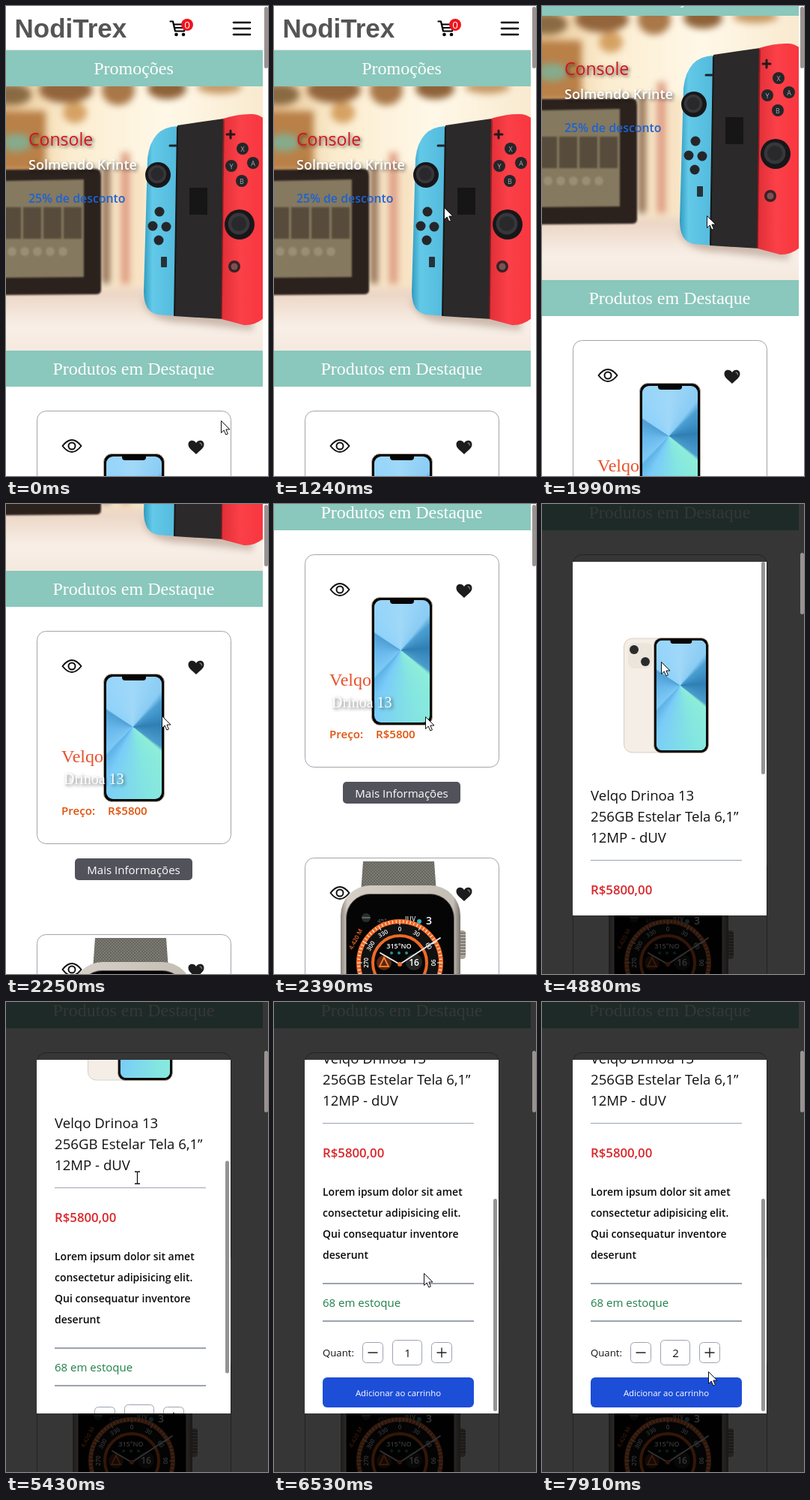
These frames come from a looping animation (350 by 626 pixels, 7.99 s). An HTML page:

```html
<!DOCTYPE html>
<html lang="pt">
<head>
<meta charset="utf-8">
<title>Loja</title>
<style>
html, body { margin: 0; width: 100%; height: 100%; overflow: hidden; background: #fff; }
svg { display: block; width: 350px; height: 626px; }
text { font-family: "Open Sans", "Noto Sans", sans-serif; white-space: pre; }
.serif { font-family: "Liberation Serif", serif; }
.brand { font-family: "Liberation Sans", sans-serif; font-weight: 700; }
.medium { font-weight: 500; }
.semi { font-weight: 600; }
.mid { text-anchor: middle; }
.shade { filter: drop-shadow(2px 2px 2px rgba(0,0,0,.6)); }
.soft { filter: blur(5px); }
.screen { width: 100%; height: 100%; border-radius: 9px;
  background: conic-gradient(at 48% 41%, #a0d8f8 0deg, #8accf4 38deg, #4a9fd2 48deg, #2f7fb4 85deg,
    #4a9ccc 125deg, #8eeed8 131deg, #84e6e0 165deg, #7accf8 205deg, #5db2e6 222deg,
    #7cc8f5 226deg, #68b8ec 265deg, #4f9fd4 302deg, #8fd2fa 305deg, #a0d8f8 360deg); }
</style>
</head>
<body>
<svg viewBox="0 0 350 626" xmlns="http://www.w3.org/2000/svg">
  <defs>
    <clipPath id="photoClip"><rect y="107" width="343" height="352"/></clipPath>
    <clipPath id="cardClip"><rect x="41" y="944" width="259" height="300" rx="12"/></clipPath>
    <clipPath id="modalClip"><rect x="41" y="77" width="259" height="471"/></clipPath>
    <linearGradient id="wall" x2="1" y2="0">
      <stop offset="0" stop-color="#e6c08c"/><stop offset=".25" stop-color="#fbecce"/>
      <stop offset=".6" stop-color="#fff8e8"/><stop offset="1" stop-color="#f8e8cc"/>
    </linearGradient>
    <linearGradient id="table" x2="0" y2="1">
      <stop offset="0" stop-color="#ead2c0"/><stop offset=".5" stop-color="#f8efe7"/><stop offset="1" stop-color="#f3e6da"/>
    </linearGradient>
    <linearGradient id="blue"><stop offset="0" stop-color="#2f9cc0"/><stop offset=".25" stop-color="#63c9e8"/><stop offset="1" stop-color="#52b9dc"/></linearGradient>
    <linearGradient id="red"><stop offset="0" stop-color="#e02f37"/><stop offset=".4" stop-color="#fb4048"/><stop offset="1" stop-color="#f8343e"/></linearGradient>
    <linearGradient id="metal"><stop offset="0" stop-color="#8b857d"/><stop offset=".06" stop-color="#d5cfc7"/><stop offset=".94" stop-color="#c4beb5"/><stop offset="1" stop-color="#77726b"/></linearGradient>
    <pattern id="weave" width="4" height="4" patternUnits="userSpaceOnUse">
      <rect width="4" height="4" fill="#7d7c74"/><path d="M0 0l2 2 2-2M0 4l2-2 2 2" stroke="#66665f" fill="none"/>
    </pattern>
  </defs>
  <rect width="350" height="626" fill="#fff"/>
  <g id="page"></g>
  <rect id="shadow" width="350" height="626" fill="#000"/>
  <g id="modal" clip-path="url(#modalClip)">
    <rect x="41" y="77" width="259" height="471" fill="#fff"/>
    <g id="details"></g>
    <rect id="innerThumb" x="293" width="5" height="283" rx="2.5" fill="#949494"/>
  </g>
  <rect id="thumb" x="345" width="5" height="82" rx="2.5" fill="#999290"/>
  <g id="cursor">
    <path id="arrow" d="M.5.5V16.5L4.2 13 6.8 19 9.4 17.9 6.9 12H12Z" fill="#fff" stroke="#111"/>
    <path id="hand" d="M5.5 15V2.5Q7-.5 8.500 2.500V8Q10.500 6.500 11.500 8.800 13.500 7.500 14.500 9.800 17 9 17 11.500V16Q17 19 15 20.500V23.500H7V21L1.500 14.500Q1 11.500 3.500 12.500Z" fill="#fff" stroke="#111"/>
    <path id="beam" d="M-3.500 0H-1Q0 0 0 1 0 0 1 0H3.500M0 1V15M-3.500 16H-1Q0 16 0 15 0 16 1 16H3.500" fill="none" stroke="#111" stroke-width="1.300"/>
  </g>
</svg>
<script>
const LOOP = 7990;
const $ = id => document.getElementById(id);
const text = (x, y, size, fill, str, cls = '') =>
  `<text x="${x}" y="${y}" font-size="${size}" fill="${fill}" class="${cls}">${str}</text>`;
const rect = (x, y, w, h, fill, more = '') =>
  `<rect x="${x}" y="${y}" width="${w}" height="${h}" fill="${fill}" ${more}/>`;
const dot = (x, y, r, fill, more = '') => `<circle cx="${x}" cy="${y}" r="${r}" fill="${fill}" ${more}/>`;
const path = (d, fill, more = '') => `<path d="${d}" fill="${fill}" ${more}/>`;
const line = (d, color, width = 1) => path(d, 'none', `stroke="${color}" stroke-width="${width}" stroke-linecap="round" stroke-linejoin="round"`);
const range = n => [...Array(n).keys()];

function header() {
  return text(11.500, 42, 35, '#555', 'NodiTrex', 'brand') +
    rect(0, 58, 343, 1, '#e4e8e7') +
    line('M219.500 20.500H223L226 33.500H238L240.500 24.500H224M225 29H238', '#000', 2.200) +
    dot(227.500, 38, 2.300, '#000') + dot(237, 38, 2.300, '#000') +
    dot(242, 25, 8, '#f0141e') + text(242, 30, 13.500, '#fff', '0', 'mid') +
    line('M304 22H326M304 30H326M304 38H326', '#000', 2.600);
}

const banner = (y, str) => rect(0, y, 343, 48, '#8ac7bc') + text(170.500, y + 32, 24, '#fff', str, 'serif mid');

function photo() {
  const button = (x, y, r, letter = '') => dot(x, y, r, '#26262a') + text(x, y + 3.500, 9, '#aaa', letter, 'mid');
  const stick = (x, y, r) => dot(x, y, r, '#17171a') + dot(x - 1, y - 1, r * .72, '#37373b') + dot(x - 1, y - 1, r * .5, '#29292c');
  const blob = (x, y, rx, ry, fill) => `<ellipse cx="${x}" cy="${y}" rx="${rx}" ry="${ry}" fill="${fill}"/>`;
  const blurred = rect(-10, 97, 370, 300, 'url(#wall)') +
    rect(-15, 140, 68, 80, '#b98048') + blob(8, 118, 26, 14, '#8a6a42') + blob(14, 182, 20, 12, '#86ab8c') +
    blob(80, 112, 36, 17, '#94653c') + blob(92, 142, 16, 14, '#d6a264') + blob(150, 112, 22, 20, '#a97748') +
    blob(215, 110, 26, 14, '#8f6238') + blob(285, 108, 30, 9, '#c79a66') +
    rect(129, 215, 9, 155, '#80583c') + rect(140, 215, 48, 160, '#f7e3c4') + rect(154, 195, 11, 175, '#dd9a80') +
    rect(-10, 376, 370, 100, 'url(#table)');
  return `<g clip-path="url(#photoClip)">` + rect(0, 107, 343, 352, '#f8ead2') + `<g class="soft">${blurred}</g>` +
    `<g style="filter:blur(1.300px)">` + path('M-5 218L121 217Q127 218 127 226V378Q127 384 120 384L-5 385Z', '#2b211d') +
    path('M-5 233L104 231V361L-5 362Z', '#85795f') +
    range(4).map(i => rect(i * 27 - 4, 268, 24, 42, '#574b3c')).join('') +
    range(5).map(i => dot(8 + i * 17, 327, 6, '#9a8f76')).join('') + `</g>` +
    path('M182 390Q190 422 240 422L330 432V418L220 400Z', '#8b6d5c', 'class="soft" opacity=".4"') +
    path('M229 160Q194 161 189 203L184 380Q184 408 203 411L230 413Z', 'url(#blue)') +
    path('M229 159L291 150V417L225 413Z', '#2b2929') +
    path('M290 150Q312 143 330 144Q342 145 350 156V410Q336 426 318 425L288 417Z', 'url(#red)') +
    line('M229 162L225 412', '#171717', 2) + line('M291 152L288 416', '#8f1b21', 1.500) +
    stick(203, 225, 17) + stick(312, 291, 20) +
    [[205, 274], [196, 293], [214, 294], [204, 312]].map(([x, y]) => button(x, y, 6.500)).join('') +
    button(316, 190, 8, 'X') + button(301, 213, 8, 'Y') + button(330, 209, 8, 'A') + button(315, 233, 8, 'B') +
    line('M295 171H305M300 166V176', '#25181a', 3) + line('M219 186H227', '#1b252a', 3) +
    rect(207, 334, 8, 14, '#26323a', 'rx="1"') + dot(305, 347, 8, '#3a2225') + dot(305, 347, 4.500, '#7b5254') +
    rect(245, 242, 24, 36, '#171616') + `</g>` +
    text(30, 186, 23, '#d2141e', 'Console', 'medium shade') +
    text(30, 218, 18, '#fff', 'Solmendo Krinte', 'semi shade') +
    text(30, 262, 15.900, '#1d63d0', '25% de desconto', 'semi');
}

const phone = (x, y, k = 1) => `<g transform="translate(${x} ${y}) scale(${k})">` +
  rect(.5, .5, 81, 170, '#050505', 'rx="11" stroke="#b9a99a"') +
  `<foreignObject x="4" y="4" width="74" height="163"><div class="screen"></div></foreignObject>` +
  path('M25 3H57V5Q57 9 53 9H29Q25 9 25 5Z', '#050505') + `</g>`;

const icons = y =>
  line(`M75.500 ${y}Q88 ${y - 16} 100.500 ${y}Q88 ${y + 16} 75.500 ${y}Z`, '#111', 2) + dot(88, y, 4.500, 'none', 'stroke="#111" stroke-width="2"') +
  path(`M254 ${y + 11}C249 ${y + 6} 243.500 ${y + 3} 243.500 ${y - 2}C243.500 ${y - 8} 251 ${y - 9} 254 ${y - 4}C257 ${y - 9} 264.500 ${y - 8} 264.500 ${y - 2}C264.500 ${y + 3} 259 ${y + 6} 254 ${y + 11}Z`, '#1c1c1c') +
  line(`M259 ${y - 4}Q261.500 ${y - 3.500} 261.500 ${y - 1}`, '#777', 1.300);

const card = (y, h) => rect(41.500, y + .5, 259, h, '#fff', 'rx="12" stroke="#a3a3ad"');

function watch() {
  const cx = 168, cy = 1083;
  const spin = (a, inner) => `<g transform="rotate(${a} ${cx} ${cy})">${inner}</g>`;
  const ticks = range(72).map(i => spin(i * 5, rect(cx - .5, cy - 57, 1, i % 6 ? 4 : 7, '#fff'))).join('');
  const marks = range(12).map(i => spin(i * 30, text(cx, cy - 42, 8, '#fff', i * 30, 'mid semi'))).join('');
  return `<g clip-path="url(#cardClip)">` +
    path('M119 948H214L217 990H116Z', 'url(#weave)') + rect(242, 1040, 14, 38, '#aaa39a', 'rx="4"') +
    range(8).map(i => rect(244, 1043 + i * 4, 12, 1, '#5f5a54')).join('') +
    rect(89, 980, 160, 210, 'url(#metal)', 'rx="40"') + rect(96.500, 991.500, 144, 192, '#050505', 'rx="32" stroke="#6d6861"') +
    dot(123, 1023, 6, '#2a2c2d') + line('M118 1023H128', '#8ba3a5') +
    text(138, 1030, 8, '#777', '45°') + text(175, 1028, 8.500, '#ddd', 'IUV', 'semi') + dot(194, 1028, 3, '#35b6c8') +
    text(203, 1032, 14, '#fff', '3', 'semi') + line('M193 1037Q213 1043 218 1060', '#4aa6e0', 3) +
    spin(-62, text(cx, cy - 64, 8, '#f06a25', '4.420 M', 'mid semi')) +
    dot(cx, cy, 55, '#111', 'stroke="#f06a25" stroke-width="6"') + ticks + marks +
    dot(cx, cy, 36, '#060606', 'stroke="#f06a25" stroke-width="4"') +
    text(167, 1064, 9, '#fff', '315°NO', 'mid semi') +
    range(3).map(i => dot(157 + i * 10, 1070, 2, '#258f92')).join('') +
    dot(147, 1083, 10, '#5a2712') + path('M147 1076L153 1088H141Z', 'none', 'stroke="#f47a2d" stroke-width="2"') +
    dot(187, 1082, 11, '#242424') + text(187, 1087, 12, '#fff', '16', 'mid semi') +
    line('M168 1085L142 1070M168 1085L222 1050', '#eee', 1.800) + dot(168, 1085, 3, '#f06a25') + `</g>`;
}

$('page').innerHTML = header() + banner(59, 'Promoções') + photo() + banner(459, 'Produtos em Destaque') +
  card(539, 283) + phone(130, 596) + icons(586) +
  text(74, 714, 24, '#e8512c', 'Velqo', 'serif') + text(77, 743, 20, '#fff', 'Drinoa 13', 'serif shade') +
  text(74, 784, 15.100, '#e0520c', 'Preço:', 'semi') + text(136, 784, 15.100, '#e0520c', 'R$5800', 'semi') +
  rect(92, 842, 157, 29, '#52525b', 'rx="5"') + text(170.500, 863, 15, '#fff', 'Mais Informações', 'mid') +
  card(943, 283) + watch() + icons(990);

function details() {
  const rule = (y, h) => rect(65, y, 202, h, '#9ca3af');
  const box = (x, y, w, h) => rect(x + .5, y + .5, w - 1, h - 1, '#fff', 'rx="5" stroke="#9ca3af"');
  const lorem = ['Lorem ipsum dolor sit amet', 'consectetur adipisicing elit.', 'Qui consequatur inventore', 'deserunt'];
  return rect(109.500, -134, 74, 152, '#f4eee6', 'rx="11" stroke="#d8cfc5"') +
    rect(115, -128, 32, 34, '#ece5dc', 'rx="8"') + dot(123, -119, 6, '#2c2b2b') + dot(138, -103, 6, '#2c2b2b') +
    phone(149, -135, .9) +
    ['Velqo Drinoa 13', '256GB Estelar Tela 6,1”', '12MP - dUV'].map((s, i) => text(65, 82 + i * 28, 18.600, '#111', s)).join('') +
    rule(161, 1) + text(65, 207, 16.800, '#d9262a', 'R$5800,00', 'semi') +
    lorem.map((s, i) => text(65, 258 + i * 28, 14, '#0a0a0a', s, 'semi')).join('') +
    rule(374, 2) + text(65, 406, 15, '#1d7f47', '68 em estoque') + rule(424, 2) +
    text(65, 472, 13.200, '#111', 'Quant:') + box(118, 453, 28, 28) + box(158, 450, 40, 34) + box(210, 453, 28, 28) +
    line('M126 467H138M218 467H230M224 461V473', '#222', 1.400) +
    `<text id="count" x="178.500" y="473" font-size="15" fill="#111" class="mid"></text>` +
    rect(65, 500, 202, 40, '#1d4ed8', 'rx="6"') + text(166, 525, 11.400, '#fff', 'Adicionar ao carrinho', 'mid');
}
$('details').innerHTML = details();

const clamp = v => Math.max(0, Math.min(1, v));

// Keys are [time, value, slope per ms], joined by cubic Hermite curves.
function curve(keys, t) {
  if (t <= keys[0][0]) return keys[0][1];
  const i = keys.findIndex(k => k[0] > t);
  if (i < 0) return keys[keys.length - 1][1];
  const [t0, a, m0] = keys[i - 1], [t1, b, m1] = keys[i];
  const d = t1 - t0, u = (t - t0) / d, w = 1 - u;
  return a * w * w * (1 + 2 * u) + b * u * u * (3 - 2 * u) + d * u * w * (m0 * w - m1 * u);
}

const pageScroll = [[1540, 0, 0], [1990, 94, .1], [2390, 472, 0]];
const modalScroll = [[5060, 0, 0], [5430, 227, .4], [5920, 313, 0]];
const MAX = 313;

// Time, x, y of the pointer tip.
const track = [
  [0, 287, 552], [69, 287, 552], [70, 185, 317], [270, 185, 317], [1010, 224, 275], [1100, 227, 268], [1590, 227, 268],
  [1990, 220, 279], [2390, 202, 283], [3100, 202, 283], [3370, 92, 114], [4640, 92, 114], [4940, 175, 234],
  [5910, 175, 234], [6500, 200, 360], [6530, 200, 360], [6720, 240, 459], [7170, 225, 469],
  [7580, 225, 469], [7770, 222, 492]
];

function pointer(t) {
  const i = track.findIndex(k => k[0] > t);
  if (i < 0) return track[track.length - 1].slice(1);
  const [t0, x0, y0] = track[i - 1], [t1, x1, y1] = track[i], u = (t - t0) / (t1 - t0);
  return [x0 + (x1 - x0) * u, y0 + (y1 - y0) * u];
}

function shape(t) {
  if ((t >= 3340 && t < 4640) || (t >= 6760 && t < 7700)) return 'hand';
  return t >= 5180 && t < 5950 ? 'beam' : 'arrow';
}

function draw(t) {
  $('page').setAttribute('transform', `translate(0 ${-Math.round(curve(pageScroll, t))})`);
  $('thumb').setAttribute('y', t < 3710 ? 1 : 65);

  const open = clamp((t - 4265) / 180);
  $('shadow').setAttribute('opacity', open * .79);
  $('modal').setAttribute('opacity', open);
  const inner = curve(modalScroll, t);
  $('details').setAttribute('transform', `translate(0 ${Math.round(MAX - inner)})`);
  $('innerThumb').setAttribute('y', 77 + inner / MAX * 185);
  $('count').textContent = t < 7430 ? 1 : 2;

  const [x, y] = pointer(t), kind = shape(t);
  const dx = { arrow: 0, hand: -7, beam: .5 }[kind], dy = kind === 'beam' ? -8 : 0;
  $('cursor').setAttribute('transform', `translate(${Math.round(x) + dx} ${Math.round(y) + dy})`);
  for (const id of ['arrow', 'hand', 'beam']) $(id).setAttribute('display', id === kind ? 'inline' : 'none');
}

const start = performance.now();
function tick() {
  draw((performance.now() - start) % LOOP);
  requestAnimationFrame(tick);
}
tick();
</script>
</body>
</html>
```
